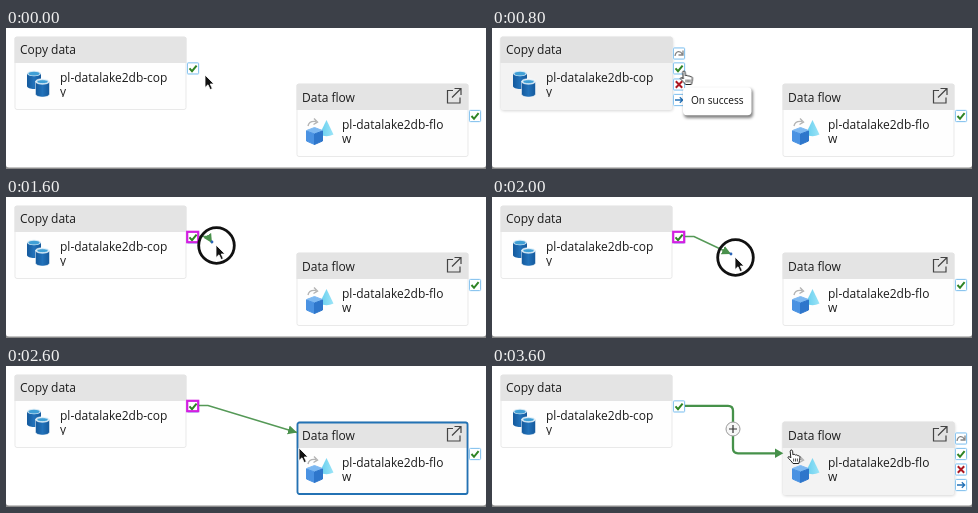
Animation of 480 by 141 pixels, one loop 3.8 s. Source, as an HTML page:

```html
<!DOCTYPE html>
<html lang="en">
<head>
<meta charset="utf-8">
<title>Connecting two pipeline activities</title>
<style>
html, body { margin: 0; width: 100%; height: 100%; overflow: hidden; background: #fff; }
svg { display: block; width: 480px; height: 141px; }
text { font: 12px "Open Sans", "Noto Sans", sans-serif; fill: #1d1d1d; }
.tip text { font-size: 10.1px; font-weight: 500; fill: #111; }

/* Everything shares one 3.8 s loop and changes on 100 ms steps. */
.hover, .tip, .arrow, .hand, .ring, .dot, .pick, .wire, .selected, .link, .ports, .cursor {
  animation: 3.8s step-end infinite;
}
.hover { animation-name: hover; }
.tip { animation-name: tip; }
.arrow { animation-name: arrow; }
.hand { animation-name: hand; }
.ring { animation-name: ring; }
.dot { animation-name: dot; }
.pick { animation-name: pick; }
.wire { animation-name: wire-show, wire; }
.selected { animation-name: selected; }
.link { animation-name: link; }
.ports { animation-name: ports; }
.cursor { animation-name: cursor; }

@keyframes hover { 0%, 36.84% { opacity: 0 } 7.89% { opacity: .5 } 10.52% { opacity: 1 } 100% { opacity: 0 } }
@keyframes tip { 0%, 31.57% { opacity: 0 } 18.42% { opacity: .5 } 21.05% { opacity: 1 } 100% { opacity: 0 } }
@keyframes arrow { 0%, 36.84% { opacity: 1 } 10.52%, 92.1% { opacity: 0 } 100% { opacity: 0 } }
@keyframes hand { 0%, 36.84% { opacity: 0 } 10.52%, 92.1% { opacity: 1 } 100% { opacity: 1 } }
@keyframes ring { 0%, 65.78% { opacity: 0 } 34.21% { opacity: 1 } 100% { opacity: 0 } }
@keyframes dot { 0%, 65.78% { opacity: 0 } 42.1% { opacity: 1 } 100% { opacity: 0 } }
@keyframes pick { 0%, 81.57% { opacity: 0 } 36.84% { opacity: 1 } 100% { opacity: 0 } }
@keyframes wire-show { 0%, 81.57% { opacity: 0 } 42.1% { opacity: 1 } 100% { opacity: 0 } }
@keyframes selected { 0%, 81.57% { opacity: 0 } 65.78% { opacity: 1 } 100% { opacity: 0 } }
@keyframes link { 0% { opacity: 0 } 81.57%, 100% { opacity: 1 } }
@keyframes ports { 0% { opacity: 0 } 92.1%, 100% { opacity: 1 } }

@keyframes cursor {
  0% { transform: translate(199px, 47px) }
  2.63% { transform: translate(198px, 46px) }
  5.26% { transform: translate(196px, 45px) }
  7.89% { transform: translate(194px, 44px) }
  10.52% { transform: translate(191.5px, 43px) }
  36.84% { transform: translate(195px, 44px) }
  39.47% { transform: translate(202px, 46px) }
  42.1% { transform: translate(210px, 48px) }
  44.73% { transform: translate(215px, 50px) }
  47.36% { transform: translate(222px, 53px) }
  49.99% { transform: translate(231px, 56px) }
  52.63% { transform: translate(243px, 60px) }
  55.26% { transform: translate(260px, 68px) }
  57.89% { transform: translate(277px, 76px) }
  60.52% { transform: translate(290px, 81px) }
  68.42% { transform: translate(293px, 82px) }
  71.05% { transform: translate(296px, 83px) }
  73.68% { transform: translate(298px, 84px) }
  76.31%, 100% { transform: translate(299px, 84px) }
}
@keyframes wire {
  0% { d: path("M193 39.5H202L206 46") }
  44.73% { d: path("M193 39.5H202L211 47") }
  47.36% { d: path("M193 39.5H202L218 50") }
  49.99% { d: path("M193 39.5H202L227 53") }
  52.63% { d: path("M193 39.5H202L239 57") }
  55.26% { d: path("M193 39.5H202L256 64") }
  57.89% { d: path("M193 39.5H202L273 72") }
  60.52% { d: path("M193 39.5H202L286 78") }
  65.78%, 100% { d: path("M193 39.5H202L291 66.5") }
}
</style>
</head>
<body>
<svg viewBox="0 0 480 141">
  <defs>
    <filter id="blur" x="-20%" y="-20%" width="140%" height="150%"><feGaussianBlur stdDeviation="1.6"/></filter>
    <clipPath id="label"><rect x="40" y="30" width="126" height="31"/></clipPath>
    <marker id="head" markerUnits="userSpaceOnUse" markerWidth="10" markerHeight="10" refX="9" refY="5" orient="auto">
      <path d="M0 .5L9 5L0 9.5Z" fill="#4a914c"/>
    </marker>
    <linearGradient id="side">
      <stop stop-color="#14599c"/><stop offset=".5" stop-color="#2272ba"/><stop offset="1" stop-color="#14599c"/>
    </linearGradient>
    <linearGradient id="cone">
      <stop stop-color="#62cdee"/><stop offset="1" stop-color="#9ce4f7"/>
    </linearGradient>

    <g id="card">
      <rect x="1" y="1" width="171" height="72.5" rx="2" fill="#fefefe" stroke="#e9e9e9"/>
      <path d="M.5 27V2.5Q.5 .7 2.5 .7H170.5Q172.5 .7 172.5 2.5V27Z" fill="#e4e4e4"/>
    </g>
    <g id="lit">
      <rect x="1" y="2" width="172" height="73" rx="3" fill="#000" opacity=".16" filter="url(#blur)"/>
      <rect x=".5" y=".5" width="172" height="73.5" rx="2" fill="#f3f3f3"/>
      <path d="M.5 27V2.5Q.5 .7 2.5 .7H170.5Q172.5 .7 172.5 2.5V27Z" fill="#e2e2e2"/>
    </g>
    <g id="box">
      <rect x="-6.5" y="-6.5" width="13" height="13" rx="2" fill="#d9efff"/>
      <rect x="-5.5" y="-5.5" width="11" height="11" rx="1" fill="#fff" stroke="#8cc5ee"/>
    </g>
    <g id="check">
      <use href="#box"/>
      <path d="M-3.5 0L-1 2.8L3.6-2.8" fill="none" stroke="#2f8424" stroke-width="2"/>
    </g>
    <g id="others">
      <g transform="translate(179 17.5)">
        <use href="#box"/>
        <path d="M-4 2.5C-3-3 1.5-3 3.5 1M4-3V1.5H-.5" fill="none" stroke="#858585" stroke-width="1.3"/>
      </g>
      <g transform="translate(179 48.5)">
        <use href="#box"/>
        <path d="M-3.2-3.2L3.2 3.2M3.2-3.2L-3.2 3.2" stroke="#ad1822" stroke-width="2"/>
      </g>
      <g transform="translate(179 64)">
        <use href="#box"/>
        <path d="M-4 0H3.5M.8-2.8L3.7 0L.8 2.8" fill="none" stroke="#2370b5" stroke-width="1.3"/>
      </g>
    </g>
    <g id="drum">
      <path d="M0 3V15.5C0 19.5 14 19.5 14 15.5V3Z" fill="url(#side)"/>
      <ellipse cx="7" cy="3" rx="7" ry="2.8" fill="#d5e9f5"/>
      <ellipse cx="7" cy="3.2" rx="5.6" ry="1.9" fill="#3f9fd6"/>
    </g>
  </defs>

  <rect width="480" height="141" fill="#8b8b8b"/>
  <path d="M0 0H480V137Q480 139.5 477 139.5H3Q0 139.5 0 137Z" fill="#fff"/>

  <g transform="translate(8 8)">
    <use href="#card"/>
    <use class="hover" href="#lit"/>
    <text x="6" y="18.4">Copy data</text>
    <g clip-path="url(#label)">
      <text x="46" y="46">pl-datalake2db-cop</text>
      <text x="46" y="60">y</text>
    </g>
    <use href="#drum" x="13" y="34.5"/>
    <use href="#drum" x="21.5" y="42.5" stroke="#fff" stroke-width=".5"/>
    <use href="#check" x="179" y="32.4"/>
    <use class="hover" href="#others"/>
  </g>

  <g transform="translate(290 55)">
    <use href="#card"/>
    <use class="ports" href="#lit"/>
    <text x="6" y="18.5">Data flow</text>
    <path d="M157 7.5H151.5V20H164V14.5M158.5 5.5H165V12M165 5.5L156 14.5" fill="none" stroke="#444" stroke-width="1.2"/>
    <g clip-path="url(#label)">
      <text x="46" y="46">pl-datalake2db-flo</text>
      <text x="46" y="60">w</text>
    </g>
    <path d="M30.5 37L37.5 51.5Q30.5 55 23.5 51.5Z" fill="url(#cone)"/>
    <path d="M12 43Q13 37.5 20 38.5M18 35.5L21.5 39L17.5 41.5" fill="none" stroke="#b4b4b4" stroke-width="1.4"/>
    <g stroke-linejoin="round">
      <path d="M10.5 47.5L18.5 44.5L26.5 47.5L18.5 51Z" fill="#7db8f1" stroke="#7db8f1"/>
      <path d="M10.5 48L18.5 51V61.5L10.5 58Z" fill="#4a92e2" stroke="#4a92e2"/>
      <path d="M26.5 48L18.5 51V61.5L26.5 58Z" fill="#2e76cb" stroke="#2e76cb"/>
    </g>
    <use href="#check" x="179" y="33"/>
    <use class="ports" href="#others"/>
    <rect class="selected" x="1.5" y="1.5" width="170" height="71.5" rx="2" fill="none" stroke="#2372b4" stroke-width="1.8"/>
  </g>

  <rect class="pick" x="181.2" y="34.8" width="11" height="10.4" fill="none" stroke="#d31fe0" stroke-width="2.2"/>
  <path class="wire" d="M193 39.5H202L206 46" fill="none" stroke="#559957" stroke-width="1.6" marker-end="url(#head)"/>

  <g class="link">
    <path d="M193 39.8H236Q241 39.8 241 44.8V82.3Q241 87.3 246 87.3H284" fill="none" stroke="#46914a" stroke-width="2.3"/>
    <path d="M283 82.5L291.3 87.3L283 92Z" fill="#46914a"/>
    <circle cx="241" cy="63" r="7" fill="#f7f7f7" stroke="#9a9a9a"/>
    <path d="M237 63H245M241 59V67" stroke="#333" stroke-width="1.2"/>
  </g>

  <g class="tip">
    <rect x="192" y="61" width="69" height="29" rx="4" fill="#000" opacity=".5" filter="url(#blur)"/>
    <rect x="191" y="59.3" width="68.5" height="28" rx="4" fill="#fff"/>
    <text x="199" y="76">On success</text>
  </g>

  <g class="cursor">
    <circle class="ring" cx=".5" cy=".5" r="17.8" fill="none" stroke="#111" stroke-width="2.8"/>
    <circle class="dot" cx="-4" cy="-3" r="1.4" fill="#2b63b8"/>
    <path class="arrow" d="M0 0V12.5L3 9.8L5.2 14.6L7.3 13.6L5.2 9H9Z" fill="#111" stroke="#fff" stroke-width=".8"/>
    <g class="hand" fill="#fff" stroke="#222" stroke-linejoin="round">
      <path d="M-.8 1.2C-.8-.4 1.5-.4 1.6 1.2L2 5C2.6 4 4.2 4.2 4.5 5.2C5.4 4.5 6.6 4.9 6.8 5.8C8 5.4 8.9 6 8.9 7.2Q9 10 7.8 13.5H2Q0 10.5-2.7 8.2C-3.8 6.6-1.8 5.8-.2 8Z"/>
      <path d="M2.6 8.5V11.5M4.5 8.5V11.5M6.4 8.5V11.5" stroke-width=".8"/>
    </g>
  </g>
</svg>
</body>
</html>
```
